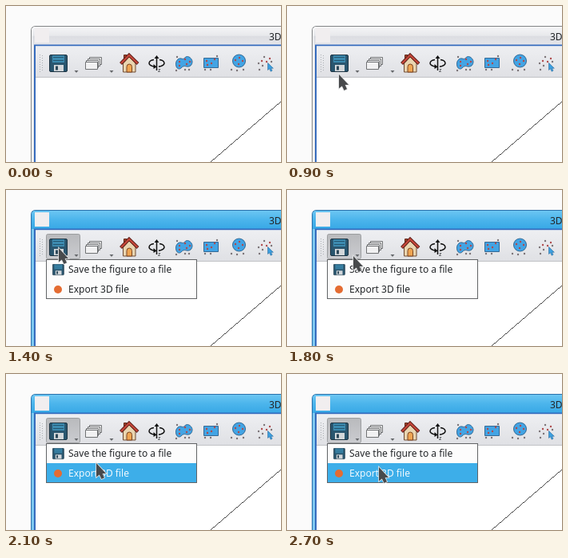
Animation, 344 px wide and 196 px high, one loop 2.8 s. Source, as an HTML page:

```html
<!DOCTYPE html>
<html lang="en">
<head>
<meta charset="utf-8">
<title>Export menu</title>
<style>
  html, body { margin: 0; width: 100%; height: 100%; overflow: hidden; background: #fbfbfb; }
  svg { display: block; width: 344px; height: 196px; }
  text { font: 12px "Noto Sans", sans-serif; fill: #232629; }

  .cursor, .idle, .active, .hover, .menu, .save, .export { animation: 2.8s step-end infinite; }
  .cursor { animation-name: move; }
  .idle { animation-name: idle; }
  .active, .menu { animation-name: open; }
  .hover { animation-name: hover; }
  .save { animation-name: save; }
  .export { animation-name: export; }
  .lit text { fill: #eff8fd; }

  @keyframes move {
    0% { transform: translate(84px, 210px); }
    21.428% { transform: translate(82px, 190px); }
    25% { transform: translate(78px, 172px); }
    28.571% { transform: translate(69px, 110px); }
    32.142% { transform: translate(65px, 86px); }
    35.714% { transform: translate(65px, 79px); }
    39.285% { transform: translate(66px, 73px); }
    57.142% { transform: translate(68px, 74px); }
    60.714% { transform: translate(75px, 78px); }
    64.285% { transform: translate(83px, 83px); }
    67.857% { transform: translate(92px, 92px); }
    71.428% { transform: translate(104px, 103px); }
    75% { transform: translate(113px, 112px); }
    78.571%, 100% { transform: translate(115px, 117px); }
  }
  @keyframes idle { 0% { opacity: 1; } 46.428%, 100% { opacity: 0; } }
  @keyframes open { 0% { opacity: 0; } 46.428%, 100% { opacity: 1; } }
  @keyframes hover { 0% { opacity: 0; } 35.714% { opacity: 1; } 46.428%, 100% { opacity: 0; } }
  @keyframes save { 0% { opacity: 0; } 67.857% { opacity: 1; } 75%, 100% { opacity: 0; } }
  @keyframes export { 0% { opacity: 0; } 75%, 100% { opacity: 1; } }
</style>
</head>
<body>
<svg viewBox="0 0 344 196">
  <defs>
    <linearGradient id="grayBar" x2="0" y2="1">
      <stop offset="0" stop-color="#f5f5f7"/>
      <stop offset=".48" stop-color="#e8e9ec"/>
      <stop offset=".54" stop-color="#dcdde2"/>
      <stop offset="1" stop-color="#e4e5e9"/>
    </linearGradient>
    <linearGradient id="blueBar" x2="0" y2="1">
      <stop offset="0" stop-color="#6cc6f2"/>
      <stop offset=".48" stop-color="#4cb5ec"/>
      <stop offset="1" stop-color="#38a8e6"/>
    </linearGradient>
    <linearGradient id="tools" x2="0" y2="1">
      <stop offset="0" stop-color="#eeeff2"/>
      <stop offset="1" stop-color="#dfe0e4"/>
    </linearGradient>
    <linearGradient id="pressed" x2="0" y2="1">
      <stop offset="0" stop-color="#b9babd"/>
      <stop offset="1" stop-color="#cbccd0"/>
    </linearGradient>
    <g id="disk">
      <rect x=".5" y=".5" width="22" height="21" rx="1.5" fill="#2a566f" stroke="#1c3342"/>
      <path d="M4 1h15v9H4z" fill="#3d8bb0"/>
      <path d="M5 3.500h13M5 7.500h13" stroke="#24546e"/>
      <path d="M6 13h12v8H6z" fill="#d3d7da"/>
      <path d="M8 14.500h3v5H8z" fill="#2b4758"/>
    </g>
    <path id="drop" d="M0 0h5L2.500 3z" fill="#66696c"/>
    <path id="sheet" d="M.5.500h15v9H.5z" fill="#f1f1f2" stroke="#626567" stroke-width=".9"/>
  </defs>

  <!-- window frame -->
  <g class="idle">
    <path d="M31.500 200V31q0-5.500 5.500-5.500H350V200z" fill="#e9eaec" stroke="#808284"/>
    <path d="M32 49V31q0-5 5-5H344V49z" fill="url(#grayBar)"/>
    <path d="M32.500 196V31.500q0-5 5-5H344" fill="none" stroke="#fafafa"/>
  </g>
  <g class="active">
    <path d="M31.500 200V31q0-5.500 5.500-5.500H350V200z" fill="#7cc7ef" stroke="#2a70aa"/>
    <path d="M32 49V31q0-5 5-5H344V49z" fill="url(#blueBar)"/>
  </g>
  <rect x="36" y="28" width="18" height="18" fill="#f1eeef"/>
  <text x="329" y="43">3D</text>
  <path d="M35 48.500H344V196H35z" fill="#356bbd"/>
  <path d="M37 50.500H344V196H37z" fill="#fff"/>
  <path d="M37 50.500H344V90H37z" fill="url(#tools)"/>
  <path d="M37 89.500H344" stroke="#c0c2c5"/>
  <path d="M344 120L256 196" stroke="#111" stroke-width=".76" shape-rendering="crispEdges"/>

  <!-- toolbar -->
  <path d="M42.500 61v22M45.500 62v21" stroke="#a9acb1" stroke-dasharray="1 2"/>
  <rect class="hover" x="50.500" y="55.500" width="42" height="31" rx="2" fill="#ebecee" stroke="#b5b7b9"/>
  <rect class="active" x="50.500" y="55.500" width="42" height="31" rx="2" fill="url(#pressed)" stroke="#9b9d9f"/>
  <use href="#disk" x="54" y="61"/>
  <use href="#drop" x="85.500" y="81"/>
  <use href="#drop" x="129.500" y="81"/>

  <use href="#sheet" x="104" y="64"/>
  <use href="#sheet" x="102" y="66"/>
  <use href="#sheet" x="100" y="68"/>
  <use href="#sheet" x="99" y="70"/>

  <path d="M147.500 61.500h3.500v8h-3.500z" fill="#a5432b" stroke="#622a1c"/>
  <path d="M146.500 72l7.500-8 8 8v11h-15.500z" fill="#e9d5b0" stroke="#6f4a32"/>
  <path d="M151 83v-6.500q0-3.500 3.200-3.500t3.300 3.500V83z" fill="#efa552" stroke="#7c4522"/>
  <path d="M143.500 72.500L154 61.500l11 11" fill="none" stroke="#5e211b" stroke-width="4"/>
  <path d="M144 72L154 61.800l10.500 10.200" fill="none" stroke="#c8483b" stroke-width="2.200"/>

  <g fill="none" stroke="#111" stroke-width="1.500">
    <path d="M188.500 81V64"/>
    <path d="M185 67.500c-7 1-8 6-2 8l4 .8M192 67.500c7 1 8 6 2 8l-3 .7"/>
  </g>
  <path d="M185.500 66l3-4 3 4zM184.500 73v6l4-2.500z" fill="#111"/>
  <text x="190" y="83" style="font-size:7px">z</text>

  <g fill="#43a4e4" stroke="#2b5f8c" stroke-width=".9">
    <path d="M213 76c-2-6 2-11 6-10s3 0 6-2 8 2 8 6-3 7-7 6-5 0-7 2-5 1-6-2z"/>
    <path d="M247.500 65.500h18v12h-18z"/>
    <circle cx="291.500" cy="69" r="8"/>
  </g>
  <path d="M327.500 71.500v9l2-1.700 1.600 3.400 1.900-1-1.500-3h2.800z" fill="#3c9fdf" stroke="#28689b" stroke-width=".6"/>
  <g id="dots"></g>

  <!-- popup -->
  <g class="menu">
    <rect x="50.500" y="87.500" width="188" height="49" fill="#fcfcfc" stroke="#626466"/>
    <text x="78" y="104">Save the figure to a file</text>
    <text x="78" y="129">Export 3D file</text>
    <g class="save lit">
      <path d="M51 88h187v24H51z" fill="#3daee9"/>
      <text x="78" y="104">Save the figure to a file</text>
    </g>
    <g class="export lit">
      <path d="M51 112h187v24H51z" fill="#3daee9"/>
      <text x="78" y="129">Export 3D file</text>
    </g>
    <use href="#disk" transform="translate(58 93) scale(.64)"/>
    <circle cx="65" cy="125" r="5" fill="#e46c32"/>
  </g>

  <path class="cursor" d="M0 0V17.500L3.800 14.500 6.500 20 10 18.300 7.600 13H12z" fill="#484a4c" stroke="#e4e5e6" stroke-width="1.600" paint-order="stroke"/>
</svg>
<script>
  const layer = document.getElementById('dots');
  const dots = (x, y, color, points) => {
    for (const [dx, dy] of points) {
      const dot = document.createElementNS(layer.namespaceURI, 'circle');
      const attrs = { cx: x + dx, cy: y + dy, r: 1.2, fill: color };
      for (const key in attrs) dot.setAttribute(key, attrs[key]);
      layer.append(dot);
    }
  };
  const red = '#b04a4c', gray = '#7b7377';
  dots(211, 62, red, [[6, 8], [13, 5], [19, 8], [6, 13], [15, 11]]);
  dots(211, 62, gray, [[3, 2], [2, 19], [13, 18], [18, 18]]);
  dots(247, 62, red, [[4, 7], [10, 10], [14, 5], [5, 12]]);
  dots(247, 62, gray, [[2, 18], [9, 18], [17, 1]]);
  dots(281, 61, red, [[6, 7], [11, 4], [15, 8], [10, 12]]);
  dots(281, 61, gray, [[1, 19], [8, 20], [16, 19]]);
  dots(314, 62, red, [[6, 7], [12, 8], [16, 4]]);
  dots(314, 62, gray, [[9, 2], [2, 10], [18, 8], [7, 13], [3, 18]]);
</script>
</body>
</html>
```
